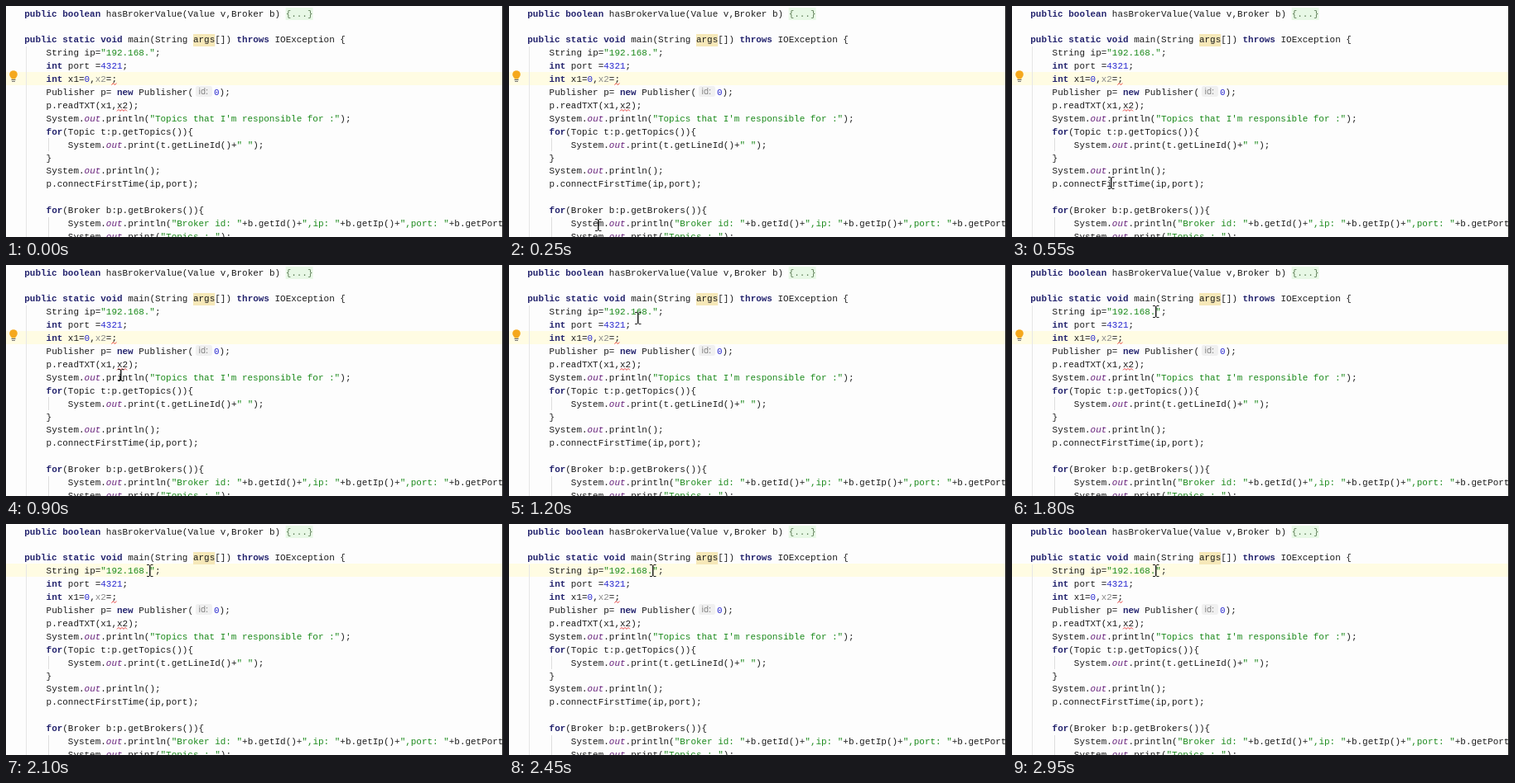
Write an HTML page with a canvas that moves like this. It is 600x280 px and loops after 3000 ms.

```html
<!DOCTYPE html>
<html lang="en">
<head>
<meta charset="utf-8">
<title>Code editor</title>
<style>
html, body { margin: 0; width: 100%; height: 100%; overflow: hidden; background: #fdfdfd; }
canvas { display: block; }
</style>
</head>
<body>
<canvas id="stage" width="600" height="280"></canvas>
<script>
const ctx = document.getElementById('stage').getContext('2d');
const LOOP = 3000, STEP = 50, CLICK = 1950;
const LEFT = 22.3, CHAR = 6.57, ROW = 15.9, BASE = 12.6;
const MONO = '10.95px "Liberation Mono", "Courier New", monospace';

const lines = [
  'public boolean hasBrokerValue(Value v,Broker b) ',
  '',
  'public static void main(String args[]) throws IOException {',
  '    String ip="192.168.";',
  '    int port =4321;',
  '    int x1=0,x2=;',
  '    Publisher p= new Publisher(',
  '    p.readTXT(x1,x2);',
  '    System.out.println("Topics that I\'m responsible for :");',
  '    for(Topic t:p.getTopics()){',
  '        System.out.print(t.getLineId()+" ");',
  '    }',
  '    System.out.println();',
  '    p.connectFirstTime(ip,port);',
  '',
  '    for(Broker b:p.getBrokers()){',
  '        System.out.println("Broker id: "+b.getId()+",ip: "+b.getIp()+",port: "+b.getPort());',
  '        System.out.print("Topics : ");'
];

const styles = {
  string: ['', '#1c8a1c'],
  keyword: ['bold ', '#24246e'],
  field: ['italic ', '#66207a'],
  number: ['', '#2a2ad0'],
  unused: ['', '#8a8a8a'],
  plain: ['', '#1c1c1c']
};
const syntax = /(?<string>"[^"]*")|(?<keyword>\b(?:public|boolean|static|void|int|new|for|throws)\b)|(?<field>\bout\b)|(?<number>\b\d+\b)|(?<unused>x2(?==))|(?<plain>\w+|[^\w\s"]+)/g;

const colX = col => LEFT + col * CHAR;
const rowY = row => BASE + row * ROW;

function text(str, x, y, style) {
  ctx.font = style[0] + MONO;
  ctx.fillStyle = style[1];
  ctx.fillText(str, x, y);
}

function codeLine(str, row) {
  for (const m of str.matchAll(syntax)) {
    const kind = Object.keys(m.groups).find(k => m.groups[k] !== undefined);
    text(m[0], colX(m.index), rowY(row), styles[kind]);
  }
}

function box(x, y, w, h, color, r = 0) {
  ctx.fillStyle = color;
  ctx.beginPath();
  ctx.roundRect(x, y, w, h, r);
  ctx.fill();
}

function squiggle(col, count, row) {
  const x = colX(col), y = rowY(row) + 2.5;
  ctx.strokeStyle = '#e84040';
  ctx.lineWidth = 1;
  ctx.beginPath();
  for (let i = 0; i * 2 <= count * CHAR; i++) ctx.lineTo(x + i * 2, y + (i % 2 ? -1 : 1));
  ctx.stroke();
}

function bulb(x, y) {
  ctx.fillStyle = '#f5a81c';
  ctx.beginPath();
  ctx.arc(x, y - 2, 4.8, 0, Math.PI * 2);
  ctx.fill();
  box(x - 2.5, y + 1, 5, 2.5, '#f5a81c');
  box(x - 2.5, y + 4, 5, 1, '#666');
  box(x - 2, y + 6, 4, 1, '#777');
}

// Pointer waypoints: time, x, y
const path = [[100, 101, 290], [550, 119, 214], [1200, 155, 64], [1550, 173, 56], [LOOP, 173, 56]];

function pointer(t) {
  if (t < path[0][0]) return;
  const i = path.findIndex(p => p[0] > t);
  const [t0, x0, y0] = path[i - 1], [t1, x1, y1] = path[i];
  const k = (t - t0) / (t1 - t0);
  const x = Math.round(x0 + (x1 - x0) * k), y = Math.round(y0 + (y1 - y0) * k);
  box(x, y - 6, 1.5, 13, '#222');
  for (const end of [y - 7, y + 7]) {
    box(x - 3, end, 3, 1, '#222');
    box(x + 1.5, end, 3, 1, '#222');
  }
}

function draw(t) {
  const clicked = t >= CLICK;
  box(0, 0, 600, 280, '#fdfdfd');
  box(0, clicked ? 48 : 80, 600, 16, '#fffce3');

  box(24, 49, 1, 231, '#e6e6e6');
  box(51, 160, 1, 16, '#dedede');
  box(51, 256, 1, 24, '#dedede');

  box(colX(31), 34, 4 * CHAR, 15, '#f6e8b8');
  box(colX(48), 2, 5 * CHAR, 15, '#e8f8e6');
  text('{...}', colX(48), rowY(0), ['', '#5c7c55']);

  lines.forEach(codeLine);

  box(229, 97, 20, 13, '#f0f0f0', 3);
  ctx.font = '10px "Open Sans", "Noto Sans", sans-serif';
  ctx.fillStyle = '#777';
  ctx.fillText('id:', 232.5, 107.3);
  text('0', 251, rowY(6), styles.number);
  text(');', 251 + CHAR, rowY(6), styles.plain);

  squiggle(16, 1, 5);
  squiggle(17, 2, 7);
  if (!clicked) bulb(9, 85);
  pointer(t);
  box(599, 0, 1, 280, '#222');
}

const start = performance.now();
function tick() {
  const t = (performance.now() - start) % LOOP;
  draw(Math.floor(t / STEP) * STEP);
  requestAnimationFrame(tick);
}
tick();
</script>
</body>
</html>
```
